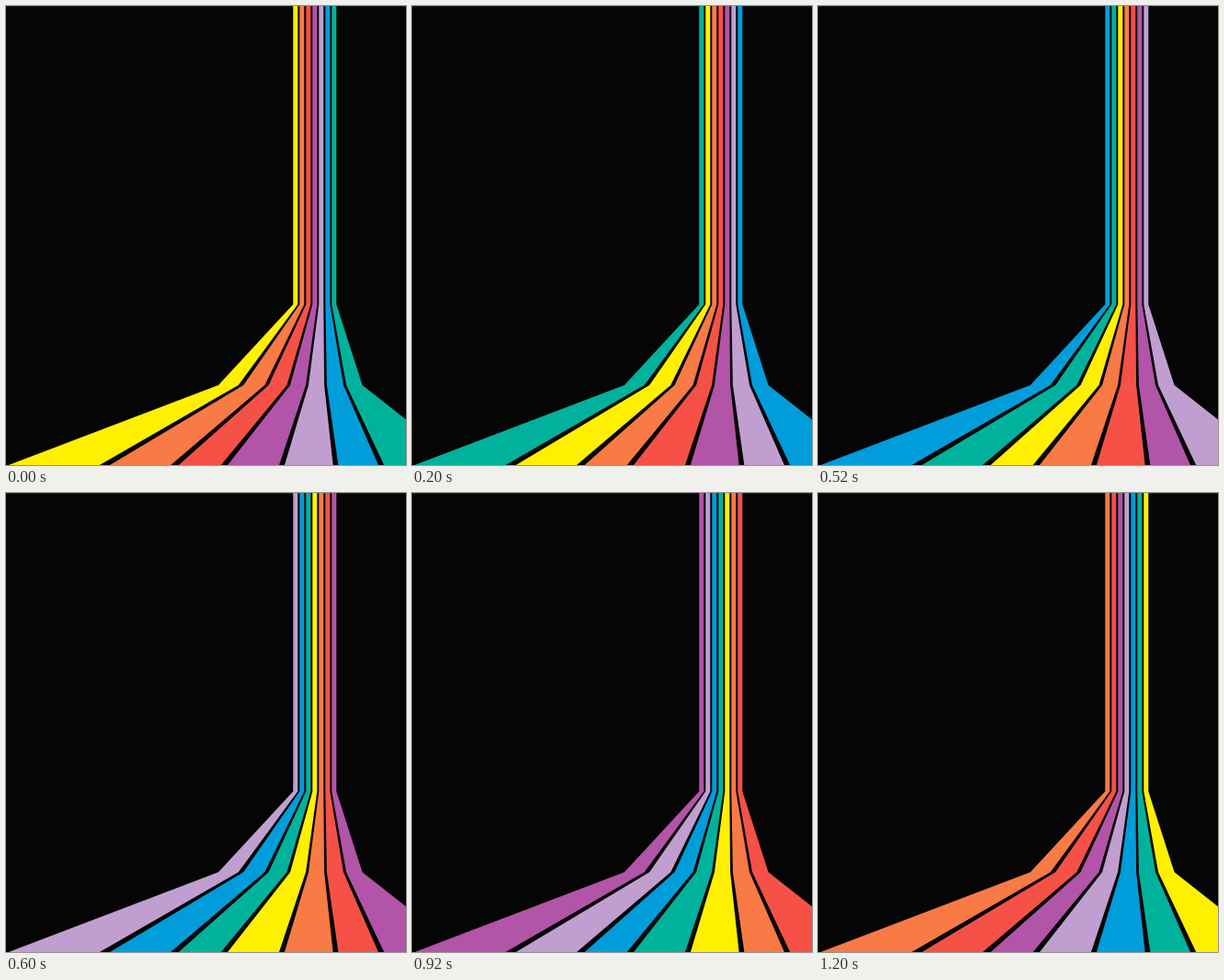
An HTML page for the animation above (1400 ms loop, 435 px wide and 500 px high).

```html
<!DOCTYPE html>
<html lang="en">
<head>
<meta charset="utf-8">
<title>Rainbow stripes</title>
<style>
  html, body { margin: 0; width: 100%; height: 100%; overflow: hidden; background: #050505; }
  svg { display: block; width: 100%; height: 100%; }
</style>
</head>
<body>
<svg id="stage" viewBox="0 0 435 500" preserveAspectRatio="none">
  <rect width="435" height="500" fill="#050505"/>
  <rect width="435" height="1" fill="#1a1a1a"/>
</svg>
<script>
const STEP = 200;
const COLORS = ['#fff000', '#f87a45', '#f55147', '#b254a8', '#c09fd0', '#009dda', '#00b29c'];
const COUNT = COLORS.length;

const BEND_Y = 325, KNEE_Y = 413, FLOOR_Y = 500;
const LEFT = 312.3, RIGHT = 359.3;
const GAP = { top: 2, knee: 2.8, floor: 5.7 };

// Where the borders of the stripes cross the knee and the floor
const KNEE = [231, 255.5, 283.5, 307.3, 327.5, 347.5, 368.5, 387.5];
const FLOOR = [3, 107.5, 183.5, 237.5, 300, 358.5, 408, 498];

const stage = document.getElementById('stage');

// One side of a border, from top to floor; the gap widens with the slant
function edge(i, side) {
  const inner = i > 0 && i < COUNT;
  const half = inner ? side / 2 : 0;
  const pitch = (RIGHT - LEFT + GAP.top) / COUNT;
  const top = LEFT + i * pitch - (side < 0 ? GAP.top : 0);
  const drop = FLOOR_Y - KNEE_Y;
  const slant = Math.hypot(FLOOR[i] - KNEE[i], drop) / drop;
  return [
    [top, 0],
    [top, BEND_Y],
    [KNEE[i] + half * GAP.knee * slant, KNEE_Y],
    [FLOOR[i] + half * GAP.floor * slant, FLOOR_Y]
  ];
}

const stripes = COLORS.map((color, i) => {
  const shape = document.createElementNS('http://www.w3.org/2000/svg', 'polygon');
  const points = [...edge(i, 1), ...edge(i + 1, -1).reverse()];
  shape.setAttribute('points', points.join(' '));
  return stage.appendChild(shape);
});

// Colours move one stripe to the right at every step
function draw(time) {
  const shift = Math.floor(time / STEP) % COUNT;
  stripes.forEach((shape, i) => {
    shape.setAttribute('fill', COLORS[(i - shift + COUNT) % COUNT]);
  });
}

const start = performance.now();
function tick() {
  draw(performance.now() - start);
  requestAnimationFrame(tick);
}
tick();
</script>
</body>
</html>
```
